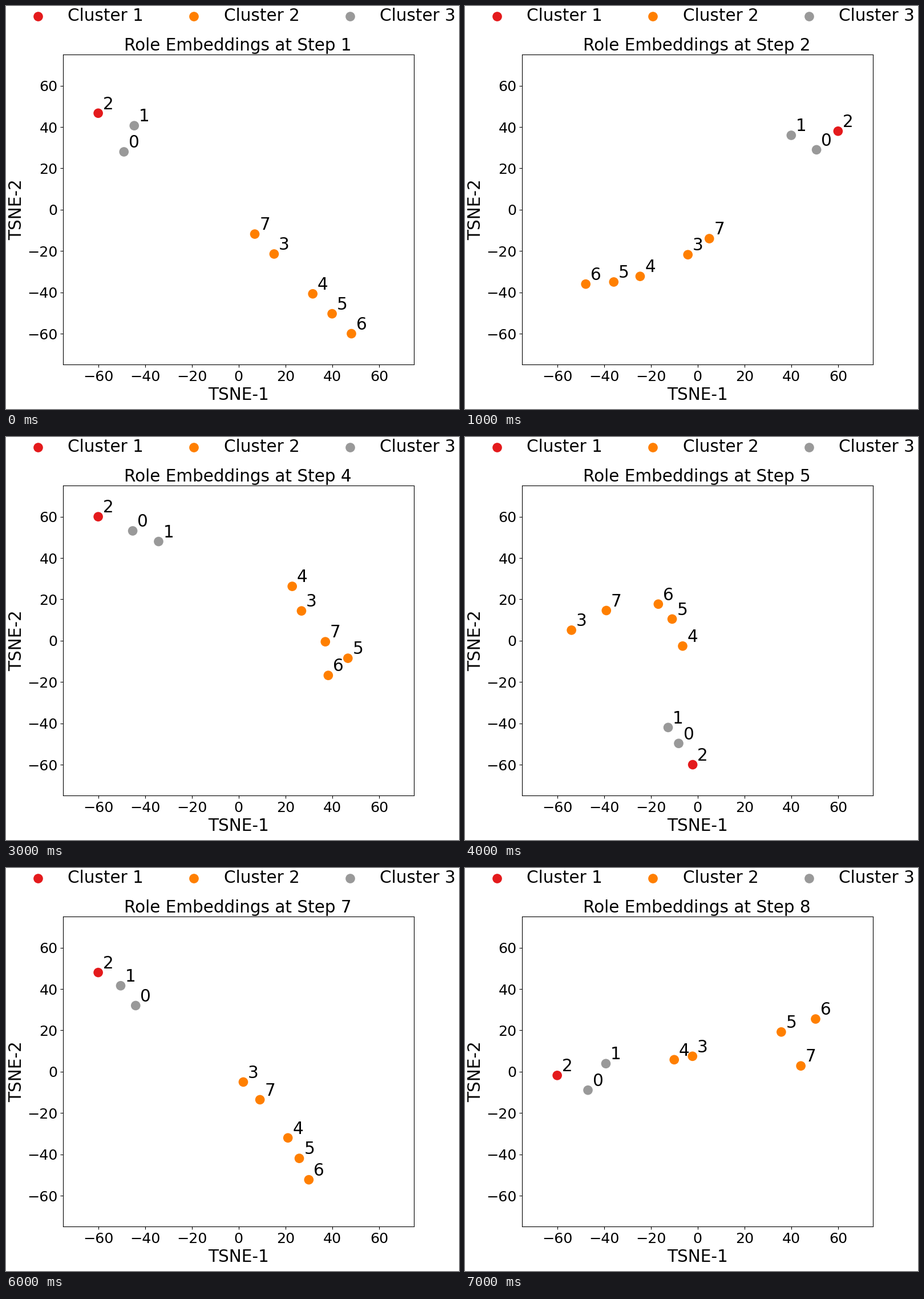
A matplotlib script for the animation above (8000 ms loop, 794 by 706 pixels).

```python
import matplotlib.pyplot as plt
import numpy as np
from matplotlib.animation import FuncAnimation

W, H, DPI = 794, 706, 100
RED, ORANGE, GREY = "#e41a1c", "#ff7f00", "#999999"
COLORS = [GREY, GREY, RED] + [ORANGE] * 5
BIG, SMALL = 21.25, 18.3
DOT = dict(s=110, linewidths=1.5)

# Roles lie on bowed strands: (evenly spaced slots, start, end, bow height).
# A dash is an empty slot; points are x + yj.
STEPS = [
    [("2--1-0", -60+46.7j, -49+28j, .49), ("73-456", 6.9-11.8j, 48.2-60j)],
    [("201", 60+38j, 40+36j, .4), ("73-456", 5-14j, -47.8-36j, .1)],
    [("2---01", 57.7+60j, 44.4+41.8j, -.56), ("37", .1j, .6-8.8j),
     ("4--5-6", -42-20j, -29.3-39.4j, .08)],
    [("2---0--1", -60+60j, -34.2+48j), ("4-3--7-5", 22.9+26.3j, 46.7-8.5j, -.1),
     ("6", 38.3-16.8j, 38.3-16.8j)],
    [("2---0--1", -2.1-60j, -12.6-42j), ("37", -53.9+5.1j, -39+14.6j),
     ("6-5--4", -16.8+17.7j, -6.4-2.6j, .09)],
    [("2--1-0", -60+56.4j, -42.4+38.6j, .08), ("37", 17.2+13.4j, 37-3j),
     ("4---5--6", 1.2-4.1j, 29.9-11.7j, .165)],
    [("210", -60+48j, -44+32j, .1), ("37-456", 2-5j, 30-52.3j, .05)],
    [("201", -60-1.8j, -39.2+3.9j, -.48), ("43----5-6", -10+5.8j, 50.4+25.5j, -.03),
     ("7", 44.1+2.8j, 44.1+2.8j)],
]


def layout(strands):
    """Positions of the eight roles as an (8, 2) array."""
    points = np.zeros((8, 2))
    for slots, start, end, *bow in strands:
        bow = bow[0] if bow else 0
        for role, t in zip(slots, np.linspace(0, 1, len(slots))):
            if role != "-":
                p = start + (end - start) * (t + 4j * bow * t * (1 - t))
                points[int(role)] = p.real, p.imag
    return points


plt.rcParams["font.family"] = "DejaVu Sans"
fig = plt.figure(figsize=(W / DPI, H / DPI), dpi=DPI, facecolor="white")
ax = fig.add_axes([100.1 / W, 77.66 / H, 615.3 / W, 543 / H])
ax.set(xlim=(-75, 75), ylim=(-75, 75),
       xticks=range(-60, 61, 20), yticks=range(-60, 61, 20))
ax.tick_params(labelsize=SMALL)


def label(x, y, text, **kw):
    """Text with its baseline start at pixel (x, y) from the top left."""
    return fig.text(x / W, 1 - y / H, text, fontsize=BIG,
                    ha="left", va="baseline", **kw)


title = label(206.7, 78, "")
label(354, 690, "TSNE-1")
label(27, 410, "TSNE-2", rotation=90, rotation_mode="anchor")

# Legend row above the plot
overlay = fig.add_axes([0, 0, 1, 1], facecolor="none")
overlay.set(xlim=(0, W), ylim=(H, 0))
overlay.axis("off")
for i, color in enumerate([RED, ORANGE, GREY]):
    x = 55.6 + 273.5 * i
    overlay.scatter(x, 18, c=color, **DOT)
    label(x + 52.5, 26, f"Cluster {i + 1}")

dots = ax.scatter(*layout(STEPS[0]).T, c=COLORS, **DOT)
names = [ax.text(0, 0, str(k), fontsize=BIG) for k in range(8)]


def draw(step):
    points = layout(STEPS[step])
    dots.set_offsets(points)
    for name, point in zip(names, points):
        name.set_position(point + 2)
    title.set_text(f"Role Embeddings at Step {step + 1}")
    return [dots, title, *names]


anim = FuncAnimation(fig, draw, frames=len(STEPS), interval=1000,
                     repeat=True, repeat_delay=0, blit=False)
plt.show()
```
